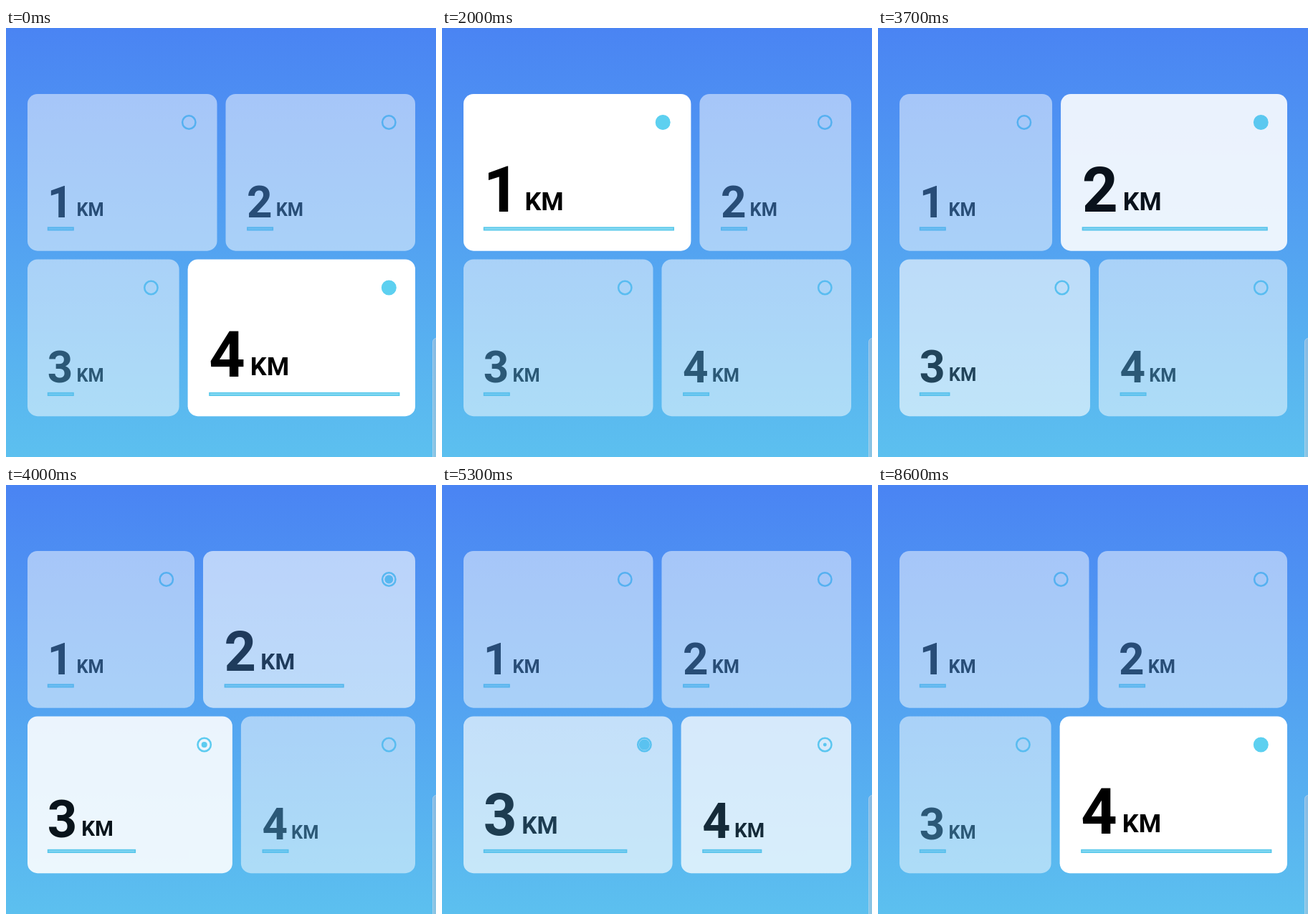
Recreate the animation shown at these times as an HTML page. Size 600 by 598 pixels, loop 9100 ms.

```html
<!DOCTYPE html>
<html lang="en">
<head>
<meta charset="utf-8">
<title>Distance picker</title>
<style>
  html, body { margin: 0; width: 100%; height: 100%; overflow: hidden; }
  body { background: linear-gradient(#4a84f3, #5cc0ef); }
  svg { display: block; width: 600px; height: 598px; }
  text { font-family: Roboto, sans-serif; font-weight: 700; }
  .num { font-size: 62px; }
  .unit { font-size: 25.3px; }
  .face { fill: #fff; }
  .ring { fill: none; stroke: #5dd0f0; stroke-width: 2.5; }
  .dot { fill: #5dd0f0; }
  .bar { fill: #8adaf3; stroke: #58c8ea; stroke-width: 1.6; }
  .edge { fill: #c3c9d4; fill-opacity: .45; stroke: #d5e2ee; stroke-opacity: .5; }
</style>
</head>
<body>
<svg id="stage" width="600" height="598">
  <rect class="edge" x="595.5" y="432.5" width="30" height="190" rx="5"/>
</svg>
<script>
const LOOP = 9100, STEP = 100, DURATION = 1000;
const LEFT = 30, RIGHT = 571, GAP = 12, HALF = 264.5, GROW = 52.9;
const ROWS = [91.9, 322.4], HEIGHT = 218.8;
const SHORT_BAR = 37, LONG_BAR = 266;

// Each tap moves the selection from one card to the next.
const taps = [
  { at: 940, from: 3, to: 0 },
  { at: 2300, from: 0, to: 1 },
  { at: 3530, from: 1, to: 2 },
  { at: 4900, from: 2, to: 3 }
];
const PRESS = { card: 3, at: 4600, ramp: 200 };

const clamp = v => Math.min(1, Math.max(0, v));
const mix = (a, b, p) => a + (b - a) * p;

function bezier(x1, y1, x2, y2) {
  const curve = (a, b, s) => 3 * a * s * (1 - s) ** 2 + 3 * b * s * s * (1 - s) + s ** 3;
  return x => {
    if (x <= 0 || x >= 1) return clamp(x);
    let lo = 0, hi = 1;
    for (let i = 0; i < 24; i++) {
      const mid = (lo + hi) / 2;
      if (curve(x1, x2, mid) < x) lo = mid; else hi = mid;
    }
    return curve(y1, y2, lo);
  };
}
const fade = bezier(.25, .1, .25, 1);
const move = bezier(.66, 0, .35, 1);

const stage = document.getElementById('stage');

function add(parent, tag, attrs, content = '') {
  const el = document.createElementNS(stage.namespaceURI, tag);
  set(el, attrs);
  el.textContent = content;
  return parent.appendChild(el);
}
function set(el, attrs) {
  for (const key in attrs) el.setAttribute(key, attrs[key]);
}

const cards = [0, 1, 2, 3].map(i => {
  const root = add(stage, 'g', {});
  const face = add(root, 'rect', { class: 'face', height: HEIGHT, rx: 14 });
  const ring = add(root, 'circle', { class: 'ring', cy: 39.6, r: 9.2 });
  const dot = add(root, 'circle', { class: 'dot', cy: 39.6 });
  const label = add(root, 'g', {});
  add(label, 'text', { class: 'num' }, i + 1);
  add(label, 'text', { class: 'unit', x: 40.6, y: -1.6 }, 'KM');
  const bar = add(root, 'rect', { class: 'bar', y: 186.2, height: 3.6 });
  return { root, face, ring, dot, label, bar };
});

function selection(t, ease) {
  const level = [0, 0, 0, 1];
  for (const tap of taps) {
    const p = ease(clamp((t - tap.at) / DURATION));
    level[tap.from] -= p;
    level[tap.to] += p;
  }
  return level;
}

function draw(t) {
  const size = selection(t, move);
  const glow = selection(t, fade);

  cards.forEach((card, i) => {
    const onRight = i % 2;
    const width = HALF + GROW * (size[i] - size[i ^ 1]);
    const x = onRight ? RIGHT - width : LEFT;
    const pad = onRight ? 29.6 : 27.8;
    const cx = width - (onRight ? 36.7 : 39.2);
    const p = size[i];

    let opacity = .5 + .5 * glow[i];
    if (i === PRESS.card && t >= PRESS.at) {
      opacity -= .25 * clamp((t - PRESS.at) / PRESS.ramp) * (1 - glow[i]);
    }

    const full = (LONG_BAR + width - 51) / 2;
    set(card.root, { transform: `translate(${x} ${ROWS[i >> 1]})`, opacity: clamp(opacity) });
    set(card.face, { width });
    set(card.ring, { cx });
    set(card.dot, { cx, r: 10 * clamp(p) });
    set(card.label, {
      transform: `translate(${pad} ${mix(171.8, 164, p)}) scale(${mix(1, 1.42, p)})`
    });
    set(card.bar, { x: pad + .8, width: mix(SHORT_BAR, full, p) - 1.6 });
  });
}

const start = performance.now();
function tick() {
  const t = (performance.now() - start) % LOOP;
  draw(Math.floor(t / STEP) * STEP);
  requestAnimationFrame(tick);
}
tick();
</script>
</body>
</html>
```
